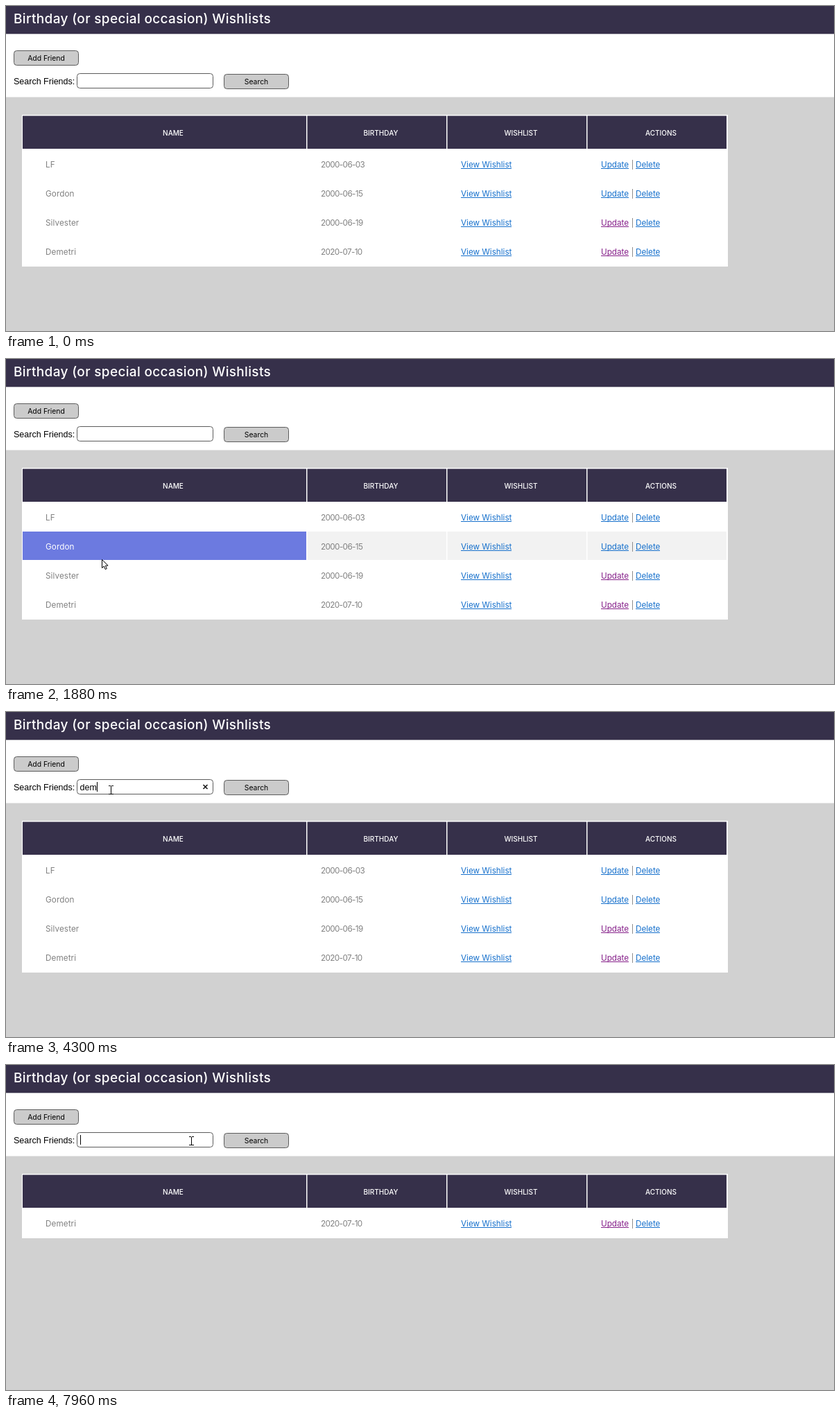
Animation of 1194x469 px, one loop 8 s. Source, as an HTML page with a canvas:

```html
<!DOCTYPE html>
<html lang="en">
<head>
<meta charset="utf-8">
<title>Wishlists</title>
<style>
html, body { margin: 0; width: 100%; height: 100%; overflow: hidden; }
canvas { display: block; width: 1194px; height: 469px; }
</style>
</head>
<body>
<canvas id="stage"></canvas>
<script>
const W = 1194, H = 469, LOOP = 8000;
const canvas = document.getElementById('stage');
const ctx = canvas.getContext('2d');
const ratio = window.devicePixelRatio || 1;
canvas.width = W * ratio;
canvas.height = H * ratio;

const SANS = 'Inter, "Open Sans", sans-serif';
const BODY = '11.7px ' + SANS;
const ARIAL = '12.5px "Liberation Sans", Arial, sans-serif';
const DARK = '#36304a', GREY = '#808080', LINK = '#1670cc', VISITED = '#86218a';

const columns = [
  { label: 'NAME', x: 24, w: 409, mid: 241 },
  { label: 'BIRTHDAY', x: 434.5, w: 200.5, mid: 540.5 },
  { label: 'WISHLIST', x: 636.5, w: 200.5, mid: 742.5 },
  { label: 'ACTIONS', x: 838.5, w: 200.5, mid: 944.5 }
];
const friends = [
  { name: 'LF', date: '2000-06-03' },
  { name: 'Gordon', date: '2000-06-15' },
  { name: 'Silvester', date: '2000-06-19', visited: true },
  { name: 'Demetri', date: '2020-07-10', visited: true }
];
const ROW_TOP = 207, ROW_STEP = 42;

// Pointer moves: time span, number of steps, waypoints [progress, x, y]
const moves = [
  { start: 70, end: 430, steps: 6, path: [[0, 1025, 480], [.17, 1021, 455], [.33, 800, 352],
    [.5, 560, 318], [.67, 445, 350], [.83, 270, 384], [1, 100, 375]] },
  { start: 740, end: 1510, steps: 11, path: [[0, 100, 375], [.2, 118, 300], [.64, 172, 84], [1, 137, 238]] },
  { start: 1660, end: 2260, steps: 9, path: [[0, 137, 238], [1, 140, 352]] },
  { start: 2440, end: 3130, steps: 10, path: [[0, 140, 352], [.2, 143, 337], [.7, 155, 173], [1, 156, 115]] },
  { start: 3310, end: 3370, steps: 2, path: [[0, 156, 115], [1, 151, 113]] },
  { start: 4760, end: 5400, steps: 9, path: [[0, 151, 113], [.56, 250, 87], [1, 352, 109]] },
  { start: 6180, end: 6180, steps: 1, path: [[0, 352, 109], [1, 351, 109]] },
  { start: 6320, end: 6560, steps: 4, path: [[0, 351, 109], [1, 232, 113]] },
  { start: 7960, end: 7960, steps: 1, path: [[0, 232, 113], [1, 267, 110]] }
];

// Search field content over time
const typing = [[0, ''], [4070, 'd'], [4150, 'de'], [4300, 'dem'], [7200, 'de'], [7340, 'd'], [7500, '']];
const FOCUS = 3370, SEARCH_DOWN = 5400, RESULT = 5540, REFOCUS = 6800, BLINK = 550;

function along(path, p) {
  let i = 1;
  while (i < path.length - 1 && path[i][0] < p) i++;
  const [p0, x0, y0] = path[i - 1], [p1, x1, y1] = path[i];
  const k = Math.min(1, (p - p0) / (p1 - p0));
  return { x: Math.round(x0 + (x1 - x0) * k), y: Math.round(y0 + (y1 - y0) * k) };
}

function pointerAt(t) {
  let move = null;
  for (const m of moves) if (t >= m.start) move = m;
  if (!move) return { x: 1025, y: 480 };
  const step = (move.end - move.start) / Math.max(1, move.steps - 1) || 1;
  const done = Math.floor((t - move.start + 7) / step) + 1;
  return along(move.path, Math.min(1, done / move.steps));
}

function rect(x, y, w, h, color) {
  ctx.fillStyle = color;
  ctx.fillRect(x, y, w, h);
}

function text(str, x, y, font, color, { align = 'left', spacing = 0 } = {}) {
  ctx.font = font;
  ctx.textAlign = align;
  ctx.letterSpacing = spacing + 'px';
  ctx.fillStyle = color;
  ctx.fillText(str, x, y);
  const width = ctx.measureText(str).width;
  ctx.letterSpacing = '0px';
  return width;
}

function link(str, x, y, color) {
  const width = text(str, x, y, BODY, color);
  rect(x, y + 1, Math.round(width), 1, color);
}

function rounded(x, y, w, h, fill) {
  ctx.beginPath();
  ctx.roundRect(x + .5, y + .5, w - 1, h - 1, 4);
  ctx.fillStyle = fill;
  ctx.fill();
  ctx.strokeStyle = '#5c5c5c';
  ctx.lineWidth = 1;
  ctx.stroke();
}

function button(label, x, y) {
  rounded(x, y, 94, 22, '#cbcbcb');
  text(label, x + 47, y + 14.5, '10.4px ' + SANS, '#000', { align: 'center' });
}

function searchField(t) {
  rounded(102, 97, 197, 22, '#fff');
  let value = '', since = t < REFOCUS ? FOCUS : REFOCUS;
  for (const [at, str] of typing) {
    if (t < at) break;
    value = str;
    since = Math.max(since, at);
  }
  const width = text(value, 106.5, 112.5, ARIAL, '#000');
  const focused = (t >= FOCUS && t < SEARCH_DOWN) || t >= REFOCUS;
  if (!focused) return;
  if ((t - since) % (2 * BLINK) < BLINK) rect(Math.round(106.5 + width), 101, 1, 14, '#000');
  if (value) {
    ctx.beginPath();
    ctx.moveTo(284.5, 105); ctx.lineTo(290.5, 111);
    ctx.moveTo(290.5, 105); ctx.lineTo(284.5, 111);
    ctx.strokeStyle = '#111';
    ctx.lineWidth = 1.5;
    ctx.stroke();
  }
}

function tableRow(friend, i, pointer) {
  const top = ROW_TOP + ROW_STEP * i, base = top + 26;
  const inRow = pointer.y >= top && pointer.y < top + ROW_STEP && pointer.x >= 24 && pointer.x < 1039;
  const isHot = c => inRow && pointer.x >= c.x && pointer.x < c.x + c.w;
  const ink = c => isHot(c) ? '#fff' : GREY;
  if (inRow) {
    for (const c of columns) rect(c.x, top, c.w, 41, isHot(c) ? '#6c7ae0' : '#f2f2f2');
  }
  text(friend.name, 57, base, BODY, ink(columns[0]), { spacing: .1 });
  text(friend.date, 454, base, BODY, ink(columns[1]), { spacing: -.6 });
  link('View Wishlist', 656, base, LINK);
  link('Update', 858, base, friend.visited ? VISITED : LINK);
  text('|', 901.5, base, BODY, ink(columns[3]));
  link('Delete', 908, base, LINK);
}

function table(t, pointer) {
  const rows = t < RESULT ? friends : friends.slice(3);
  rect(23, 157, 1018, 51 + ROW_STEP * rows.length, '#fff');
  for (const c of columns) {
    rect(c.x, 158.5, c.w, 47.5, DARK);
    text(c.label, c.mid, 187, '500 10px ' + SANS, '#fff', { align: 'center' });
  }
  rows.forEach((friend, i) => tableRow(friend, i, pointer));
}

function arrow({ x, y }) {
  const shape = [[0, 0], [0, 12], [2.8, 9.5], [4.7, 14], [6.8, 13], [4.9, 8.8], [8.6, 8.6]];
  ctx.beginPath();
  for (const [dx, dy] of shape) ctx.lineTo(x + .5 + dx, y + .5 + dy);
  ctx.closePath();
  ctx.fillStyle = '#fff';
  ctx.fill();
  ctx.strokeStyle = '#000';
  ctx.lineWidth = 1;
  ctx.stroke();
}

function beam({ x, y }) {
  rect(x, y - 6, 1, 12, '#000');
  for (const edge of [y - 7, y + 5]) {
    rect(x - 3, edge, 3, 1, '#000');
    rect(x + 1, edge, 3, 1, '#000');
  }
}

function draw(t) {
  const pointer = pointerAt(t);
  ctx.setTransform(ratio, 0, 0, ratio, 0, 0);
  rect(0, 0, W, H, '#d1d1d1');
  rect(0, 41, W, 90.5, '#fff');
  rect(0, 0, W, 40.5, DARK);
  rect(0, 40.5, W, .5, '#fff');
  text('Birthday (or special occasion) Wishlists', 11, 24.5, '500 19px ' + SANS, '#fff', { spacing: .34 });
  button('Add Friend', 11, 64);
  text('Search Friends:', 11, 112.5, ARIAL, '#000');
  searchField(t);
  button('Search', 314, 98);
  table(t, pointer);
  const overField = pointer.x > 102 && pointer.x < 298 && pointer.y > 97 && pointer.y < 119;
  (overField ? beam : arrow)(pointer);
}

const begin = performance.now();
function tick() {
  draw((performance.now() - begin) % LOOP);
  requestAnimationFrame(tick);
}
tick();
</script>
</body>
</html>
```
